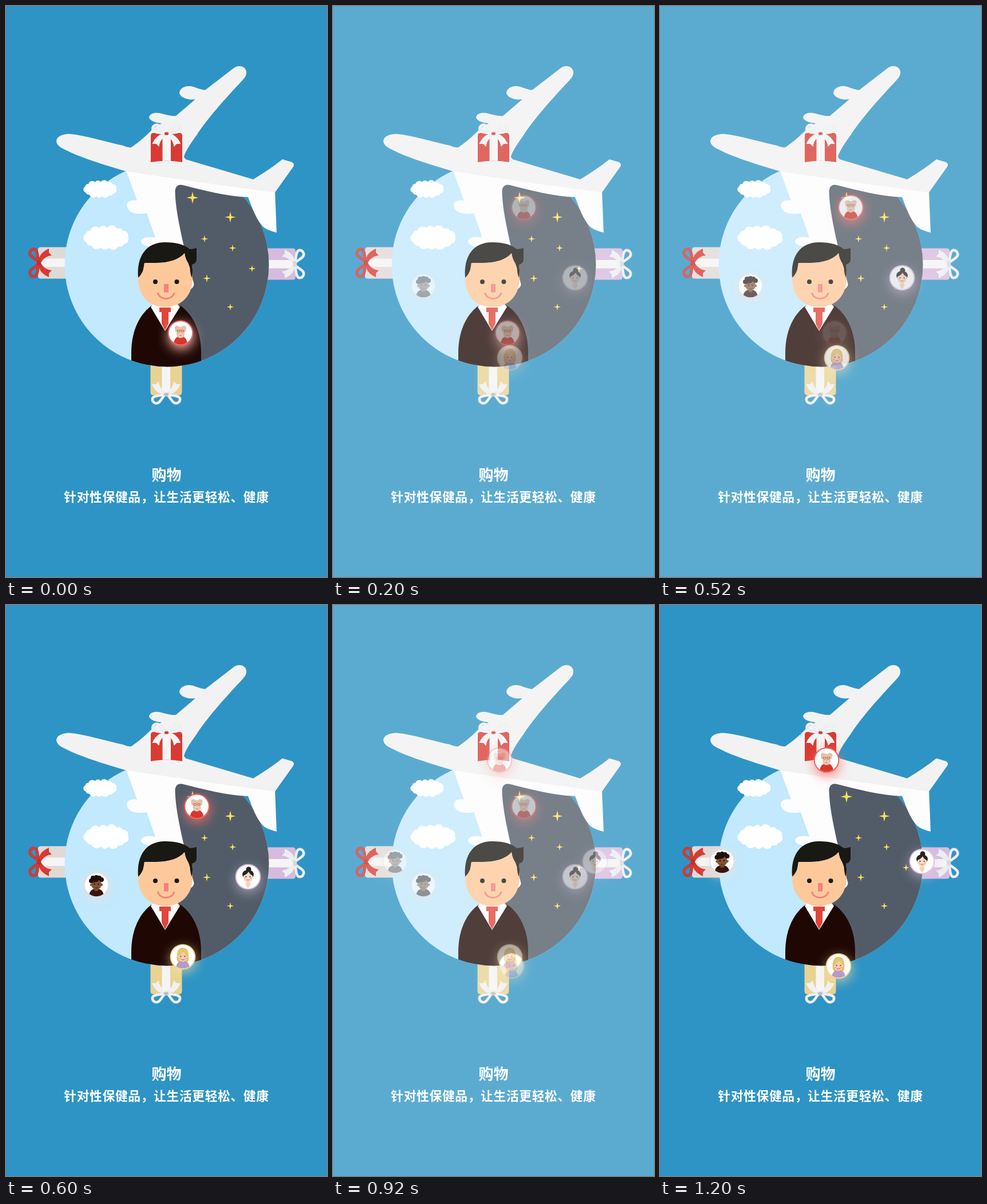
An HTML page with a canvas for the animation above (1400 ms loop, 561 by 998 pixels).

```html
<!DOCTYPE html>
<html lang="zh-CN">
<head>
<meta charset="utf-8">
<title>购物</title>
<style>
  html, body { margin: 0; width: 100%; height: 100%; overflow: hidden; background: #fff; }
  canvas { position: absolute; left: 0; top: 0; display: block; }
  p {
    position: absolute; left: 0; width: 561px; margin: 0; color: #fff; text-align: center;
    white-space: nowrap; line-height: 40px;
    font-family: "Noto Sans CJK SC", "Noto Sans CJK", sans-serif; font-weight: bold;
  }
  .title { top: 798px; font-size: 26px; }
  .note { top: 837px; font-size: 21.8px; letter-spacing: .6px; }
</style>
</head>
<body>
<canvas id="stage" width="561" height="998"></canvas>
<p class="title">购物</p>
<p class="note">针对性保健品，让生活更轻松、健康</p>
<script>
const W = 561, H = 998, STEP = 200, STEPS = 7;
const TAU = Math.PI * 2;
const GLOBE = [281, 452, 178.5];
const stage = document.getElementById('stage').getContext('2d');
let g;

function fill(d, color) {
  g.fillStyle = color;
  g.fill(new Path2D(d));
}
function line(d, color, width) {
  g.strokeStyle = color;
  g.lineWidth = width;
  g.stroke(new Path2D(d));
}
function oval(x, y, rx, ry, color) {
  g.fillStyle = color;
  g.beginPath();
  g.ellipse(x, y, rx, ry, 0, 0, TAU);
  g.fill();
}
function disc(x, y, r, color) { oval(x, y, r, r, color); }
function box(x, y, w, h, color) {
  g.fillStyle = color;
  g.fillRect(x, y, w, h);
}
function clipDisc(x, y, r) {
  g.beginPath();
  g.arc(x, y, r, 0, TAU);
  g.clip();
}
// Draw something and its mirror image about x = 0.
function mirror(draw) {
  for (const s of [1, -1]) {
    g.save();
    g.scale(s, 1);
    draw();
    g.restore();
  }
}

// Gift with the bow's knot at the given point.
function gift(x, y, turn, len, paper, bow, shade, knot) {
  const loop = 'M-2 0C-9 -2 -22 -1 -24 -7C-25 -14 -17 -18 -12 -13C-8 -9 -6 -4 -2 0Z';
  g.save();
  g.translate(x, y);
  g.rotate(turn * Math.PI / 2);
  fill(`M-27.5 4Q-27.5 -1 -23 -1H23Q27.5 -1 27.5 4V${len}Q0 ${len - 5} -27.5 ${len}Z`, paper);
  fill(`M-7 0H7.5V${len - 2}Q0 ${len - 3} -7 ${len - 2}Z`, '#f6f5f6');
  mirror(() => {
    fill('M-2 0C-13 0 -20 7 -25 18L-18 18L-13 23C-12 14 -8 8 0 4Z', bow);
    line(loop, shade, 4.8);
    line(loop, bow, 3.6);
  });
  oval(0, 0, 5, 3.4, shade);
  oval(0, 0, 3.6, 2.6, knot);
  g.restore();
}

function cloud(x, y, w, h) {
  oval(x, y, w * .42, h * .37, '#fff');
  for (let i = 0; i < 13; i++) {
    const a = i / 13 * TAU + .2;
    const r = w * (i % 2 ? .095 : .115);
    oval(x + Math.cos(a) * w * .39, y + Math.sin(a) * h * .34, r, r * .9, '#fff');
  }
}

function star(x, y, r) {
  const k = r * .27;
  g.fillStyle = '#ffe24f';
  g.beginPath();
  for (let i = 0; i < 8; i++) {
    const a = i * TAU / 8, d = i % 2 ? k : r;
    g.lineTo(x + Math.cos(a) * d, y + Math.sin(a) * d);
  }
  g.fill();
}

function globe() {
  disc(...GLOBE, '#c2e9fd');
  g.save();
  clipDisc(...GLOBE);
  fill('M290 290H470V640H280V480Z', '#525c68');
  g.restore();
  cloud(164.5, 320, 58, 30);
  cloud(175, 405, 79, 42);
}

function stars() {
  star(326, 335, 10.5);
  star(392, 369, 9.5);
  star(351, 476, 7);
  for (const [x, y] of [[347, 407], [396, 423], [430, 459], [392, 526]]) star(x, y, 6.3);
}

function plane() {
  // Underside: near wing, belly and lower tail fin
  fill(`M210 288L229 340C218 338 211 342 211 349C212 357 220 363 231 363Q239 364 246 362
    L261 405C248 402 237 405 236 411C236 416 242 419 250 420L268 424L300 505Q318 499 324 494
    Q330 489 328 484L311 420C302 380 296 350 295.500 324C296 315 301 311 309 313
    C345 322 385 333 423 334C430 352 437 372 447 383Q452 391 473 396L470 322Z`, '#fdfdfe');
  // Upper side
  fill(`M88 237C88 229 96 224 110 223.500C140 226 175 238 205 244Q212 248 219 247
    C232 238 247 226 258 213L272 205C260 204 250 200 250 194C252 187 262 185 272 188
    Q288 193 297 192L331 163C316 165 303 159 303 151C305 142 316 138 327 141Q340 146 348 147
    L396 110C405 102 417 104 420 114Q421 122 414 129C382 163 350 199 333 226
    Q313 253 311 264L314 268L432 303Q462 285 483 268L500 273Q505 276 502 281L470 326
    Q340 309 210 289C170 277 130 265 103 251Q89 245 88 237Z`, '#f2f2f3');
}

function man() {
  g.save();
  clipDisc(...GLOBE);
  fill('M219 640V606C219 573 230 542 254 524H305C330 542 341 573 341 606V640Z', '#1f0804');
  g.restore();
  fill('M253 526L262 516H295L304 526L278 568Z', '#fff');
  fill('M268 527H288V535H284V555L278 567L272 555V535H268Z', '#e04639');
  fill('M231 455H326V478C325 508 305 526 278 526C251 526 232 508 231 478Z', '#fec99a');
  fill(`M231 475C228 436 246 413 278 413C298 413 312 417 321 425Q327 425 333 423V444
    Q332 450 325 452Q327 462 325 475C321 468 323 457 318 449Q313 441 312 432
    C303 443 285 449 262 449H242Q241 466 231 475Z`, '#191813');
  fill('M242 449H262C285 449 303 443 312 432Q313 441 318 449L322 460H240Z', '#fec99a');
  disc(261, 482, 4, '#191813');
  disc(298.5, 482, 4, '#191813');
  box(276, 486, 8, 14.5, '#f0837f');
  line('M265.500 501C268 515 291 515 294 501', '#f0837b', 3);
}

const people = {
  elder: {
    ring: '#ea6661', glow: 'rgba(255,110,105,.8)',
    draw() {
      fill('M-12 22C-12 11 -8 6 0 6S12 11 12 22Z', '#d8372d');
      mirror(() => { disc(-6, -8.5, 4.2, '#d3c6b8'); disc(-7.5, -4, 2, '#eab499'); });
      fill('M-7 -8Q0 -14 7 -8V2Q6 9 0 9T-7 2Z', '#f1bfa4');
      oval(0, 4, 4.5, 3.5, '#e9cdba');
      mirror(() => line('M-5.500 -5H-1V-2.500Q-3 -.5 -5.500 -2.500Z', '#8b5d4d', .8));
      line('M-2 4Q0 5 2 4', '#c96c5d', 1);
    }
  },
  curly: {
    ring: '#e4ddda', glow: 'rgba(235,225,222,.6)',
    draw() {
      fill('M-13 22C-13 12 -9 7 0 7S13 12 13 22Z', '#35160e');
      box(-3, 4, 6, 7, '#764124');
      oval(0, -1, 9, 9.5, '#8b5130');
      mirror(() => disc(-9, 0, 2.2, '#8b5130'));
      for (const [x, y] of [[-9, -7], [-6, -12], [0, -13], [5, -12], [9, -9], [0, -9], [-4, -8]])
        disc(x, y, 4, '#20100c');
      mirror(() => disc(-3.5, -1, 1.2, '#20100c'));
      line('M-3 5Q0 6.500 3 5', '#43210f', 1.2);
    }
  },
  bun: {
    ring: '#d9c6e2', glow: 'rgba(225,205,236,.55)',
    draw() {
      fill('M-10 22Q-9 12 -3 10H3Q9 12 10 22Z', '#fff');
      fill('M-3 6H3V11L5 13L0 20L-5 13L-3 11Z', '#f8d1b7');
      disc(1, -13, 4.5, '#262326');
      oval(0, -4, 10, 8, '#262326');
      fill('M-8 -2Q-2 -4 1 -9Q3 -4 8 -2Q8 10 0 10T-8 -2Z', '#fcd9c2');
      mirror(() => { disc(-3.5, 0, 1, '#262326'); disc(-5, 3, 1.5, '#f5b3a2'); });
      line('M-2.500 5Q0 7 2.500 5', '#dc5d57', 1.2);
    }
  },
  blond: {
    ring: '#eed797', glow: 'rgba(250,226,160,.65)',
    draw() {
      fill('M-10 6C-11 -4 -10 -16 0 -16S11 -4 10 6L7 10H-7Z', '#e4c064');
      fill('M-12 22C-12 12 -8 7 0 7S12 12 12 22Z', '#b49bc7');
      oval(0, 0, 8, 8.5, '#fccdb0');
      fill('M-9 0Q-9 -14 0 -14T9 0Q4 -3 1 -11Q-3 -3 -9 0Z', '#e8c66e');
      mirror(() => { disc(-3.5, -1, 1.1, '#503a35'); disc(-5, 2.5, 1.6, '#f5a99a'); });
      line('M-3 4Q0 7 3 4', '#d85f59', 1.1);
    }
  }
};

function badge([name, x, y, glow]) {
  const p = people[name];
  g.save();
  g.translate(x, y);
  g.shadowColor = glow || p.glow;
  g.shadowBlur = 20;
  g.shadowOffsetX = 1;
  g.shadowOffsetY = 6;
  disc(0, 0, 22.3, p.ring);
  g.shadowColor = 'transparent';
  disc(0, 0, 20.3, '#fff');
  clipDisc(0, 0, 20.3);
  p.draw();
  g.restore();
}

function scene(badges) {
  const c = document.createElement('canvas');
  c.width = W;
  c.height = H;
  g = c.getContext('2d');
  box(0, 0, W, H, '#2e94c5');
  gift(57, 449, -1, 70, '#e0dad7', '#d93932', '#bd2c2a', '#c52e2b');
  gift(505, 451, 1, 70, '#d7bbdd', '#eceef2', '#d5d8df', '#d9d9dd');
  gift(280, 679, 2, 70, '#e9d393', '#f1f1f3', '#dadbdd', '#bdbbb5');
  globe();
  stars();
  plane();
  gift(280.5, 223, 0, 50, '#d93b34', '#f2f3f5', '#dfe1e5', '#d93b34');
  man();
  badges.forEach(badge);
  return c;
}

const scenes = [
  scene([['elder', 305, 571.5, '#ffb9b4']]),
  scene([['elder', 333.5, 352], ['curly', 158, 489], ['bun', 423, 475], ['blond', 309, 615]]),
  scene([['elder', 291, 271], ['curly', 108.5, 448], ['bun', 458, 448], ['blond', 312, 631]])
];

function layer(img, alpha) {
  stage.globalAlpha = alpha;
  stage.drawImage(img, 0, 0);
}

// Each scene holds for one step, then crossfades over white in thirds.
function frame(now) {
  const step = Math.floor(now / STEP) % STEPS;
  const i = Math.floor(step / 3), mix = step % 3 / 3;
  stage.globalAlpha = 1;
  stage.fillStyle = '#fff';
  stage.fillRect(0, 0, W, H);
  layer(scenes[i], 1 - mix);
  if (mix) layer(scenes[i + 1], mix);
}

const start = performance.now();
function tick() {
  frame(performance.now() - start);
  requestAnimationFrame(tick);
}
tick();
</script>
</body>
</html>
```
